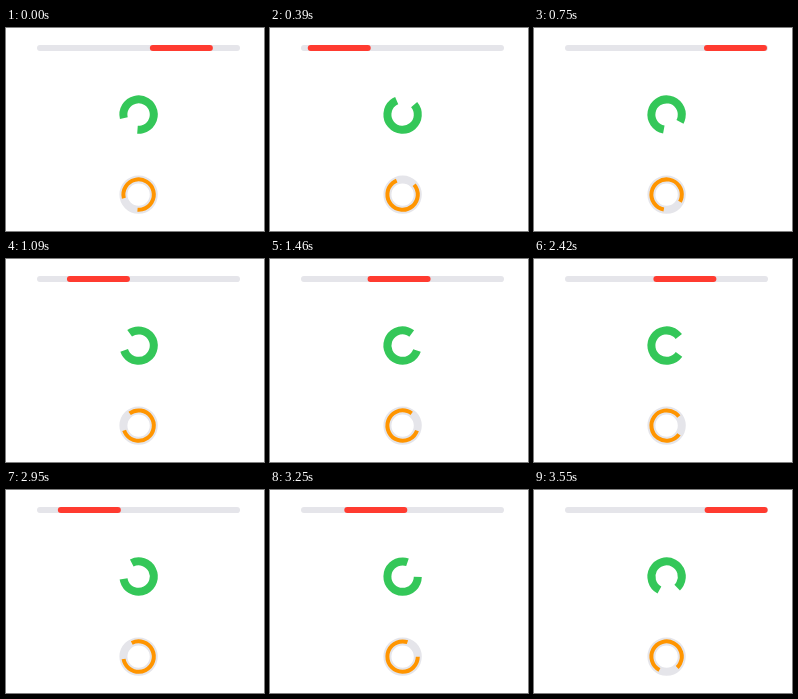
Recreate the animation shown at these times as an HTML page. Size 258 px wide and 203 px high, loop 3650 ms.

```html
<!DOCTYPE html>
<html lang="en">
<head>
<meta charset="utf-8">
<title>Loading indicators</title>
<style>
  html, body { margin: 0; width: 100%; height: 100%; overflow: hidden; background: #fff; }
  svg { display: block; }
  circle { fill: none; }
  .track { fill: #e5e5ea; }
  .ring { stroke: #e5e5ea; stroke-width: 8; }
  .thumb { fill: #ff3b30; }
  .arc { stroke-dasharray: 0.8 0.2; }
  .green { stroke: #34c759; stroke-width: 8; }
  .orange { stroke: #ff9500; stroke-width: 4; }
</style>
</head>
<body>
<svg width="258" height="203" viewBox="0 0 258 203">
  <rect class="track" x="31" y="17" width="203" height="6" rx="3"/>
  <rect class="thumb" x="31" y="17" width="63" height="6" rx="3"/>
  <g transform="translate(132.6 86.6)">
    <circle class="arc green" r="15.2" pathLength="1"/>
  </g>
  <g transform="translate(132.6 166.6)">
    <circle class="ring" r="15.2"/>
    <circle class="arc orange" r="15.2" pathLength="1"/>
  </g>
</svg>
<script>
  const LOOP = 3650, LAST_MOVE = 3550;
  const TURN = 918, START_ANGLE = 166;
  const SLIDE = TURN / 2, SLIDE_OFFSET = 139;
  const LEFT = 31, TRAVEL = 140;

  const thumb = document.querySelector('.thumb');
  const arcs = document.querySelectorAll('.arc');

  // cubic-bezier(.42, 0, .58, 1), solved with Newton steps
  function easeInOut(x) {
    let s = x;
    for (let i = 0; i < 4; i++) {
      s -= (1.26 * s - 0.78 * s * s + 0.52 * s ** 3 - x) / (1.26 - 1.56 * s + 1.56 * s * s);
    }
    return s * s * (3 - 2 * s);
  }

  function draw(t) {
    const angle = START_ANGLE + 360 * t / TURN;
    arcs.forEach(arc => arc.setAttribute('transform', `rotate(${angle})`));

    // Slides back and forth, starting from the right end
    const phase = (t + SLIDE_OFFSET) / SLIDE % 2;
    thumb.setAttribute('x', LEFT + TRAVEL * easeInOut(Math.abs(1 - phase)));
  }

  const start = performance.now();
  function tick(now) {
    draw(Math.min(Math.max(0, now - start) % LOOP, LAST_MOVE));
    requestAnimationFrame(tick);
  }
  draw(0);
  requestAnimationFrame(tick);
</script>
</body>
</html>
```
